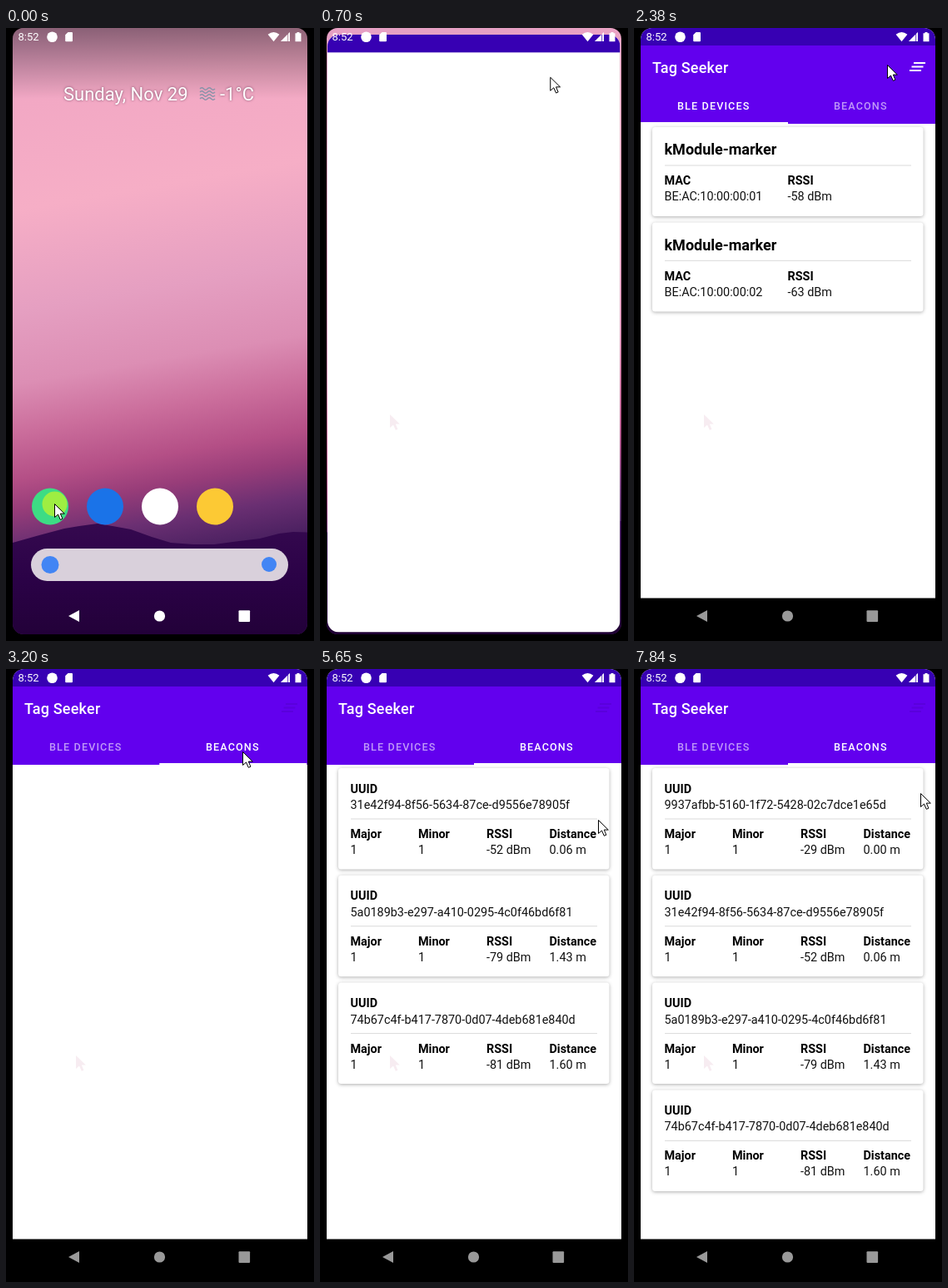
Recreate the animation shown at these times as an HTML page. Size 370 by 736 pixels, loop 8000 ms.

```html
<!DOCTYPE html>
<html lang="en">
<head>
<meta charset="utf-8">
<title>Beacon list</title>
<style>
  html, body { margin: 0; width: 100%; height: 100%; overflow: hidden; background: #000; }
  svg { display: block; width: 370px; height: 736px; }
  text { font-family: Roboto, "Noto Sans", sans-serif; font-size: 14.4px; fill: #111; white-space: pre; }
  .b { font-weight: 700; fill: #000; }
  .h { font-size: 18px; }
  .bar { font-size: 18px; font-weight: 500; letter-spacing: .22px; fill: #fff; }
  .tab { font-size: 12.6px; font-weight: 500; letter-spacing: 1.125px; fill: #fff; }
  .clock { font-size: 13px; fill: #fff; }
  .date { font-size: 22px; fill: #fff; filter: drop-shadow(0 0 1.5px rgba(60,20,50,.6)); }
  .card { fill: #fff; filter: drop-shadow(0 1.5px 2px rgba(0,0,0,.32)); }
</style>
</head>
<body>
<svg viewBox="0 0 370 736" xmlns="http://www.w3.org/2000/svg">
  <defs>
    <clipPath id="phone"><rect x="8" y="0" width="354" height="728" rx="13"/></clipPath>
    <clipPath id="winClip"><rect id="winShape" rx="16"/></clipPath>
    <linearGradient id="sky" gradientUnits="userSpaceOnUse" x1="110" y1="0" x2="230" y2="700">
      <stop offset="0" stop-color="#e6a0c4"/>
      <stop offset=".1" stop-color="#f2a8c4"/>
      <stop offset=".28" stop-color="#f6aec6"/>
      <stop offset=".45" stop-color="#e59fc1"/>
      <stop offset=".57" stop-color="#dc8eb4"/>
      <stop offset=".65" stop-color="#cb6e9c"/>
      <stop offset=".73" stop-color="#b44f86"/>
      <stop offset=".78" stop-color="#983d79"/>
      <stop offset=".84" stop-color="#6a2f72"/>
      <stop offset=".9" stop-color="#4a2060"/>
    </linearGradient>
    <linearGradient id="hill" x1="0" y1="0" x2="0" y2="1">
      <stop offset="0" stop-color="#35094f"/>
      <stop offset=".35" stop-color="#2b0247"/>
      <stop offset="1" stop-color="#1c002e"/>
    </linearGradient>
    <linearGradient id="scrim" x1="0" y1="0" x2="0" y2="1">
      <stop offset="0" stop-color="#000" stop-opacity=".4"/>
      <stop offset="1" stop-color="#000" stop-opacity="0"/>
    </linearGradient>
    <path id="arrow" d="M0 0V16L4 12.5 6.8 18.8 9.4 17.7 6.8 11.6H11.8Z"/>
  </defs>

  <rect width="370" height="736"/>
  <g clip-path="url(#phone)">
    <g id="home">
      <g id="paper">
        <rect x="-30" y="-40" width="430" height="820" fill="url(#sky)"/>
        <path fill="url(#hill)" d="M-30 626L8 618 40 609 70 601 88 598 110 595 128 598 150 602 175 611 198 618 225 620 250 620 280 616 305 613 328 607 345 605 400 607V780H-30Z"/>
      </g>
      <rect id="shade" x="8" width="354" height="85" fill="url(#scrim)"/>
      <g id="desk">
        <text class="date" x="69" y="87">Sunday, Nov 29</text>
        <text class="date" x="257" y="87">-1°C</text>
        <g id="fog" fill="none" stroke="#8c93a9" stroke-width="1.5"></g>
        <circle id="app" cx="53" cy="574.5" r="22" fill="#3ddc84"/>
        <circle cx="119" cy="574.5" r="22" fill="#1a73e8"/>
        <circle cx="185" cy="574.5" r="22" fill="#fff"/>
        <circle cx="251" cy="574.5" r="22" fill="#fcc934"/>
        <rect x="30" y="625" width="309" height="39" rx="19.5" fill="#d9d0db"/>
        <circle cx="53" cy="644.5" r="10.5" fill="#4285f4"/>
        <circle cx="316" cy="644" r="9" fill="#4285f4"/>
      </g>
    </g>

    <g id="win" clip-path="url(#winClip)">
      <rect id="winBody" fill="#fff"/>
      <rect id="winTop" fill="#3700b3"/>
    </g>

    <g id="screen">
      <g id="page1"></g>
      <g id="page2"></g>
      <rect x="8" y="21" width="354" height="94" fill="#6200ee"/>
      <text class="bar" x="22" y="54">Tag Seeker</text>
      <g fill="none" stroke-width="2">
        <path id="ghostMenu" stroke="#5a00dc" d="M336 42h14M333.5 46.5h14M331 51h14"/>
        <path id="menu" stroke="#fff" d="M336 42h14M333.5 46.5h14M331 51h14"/>
      </g>
      <text class="tab" id="tab1" x="52" y="98">BLE DEVICES</text>
      <text class="tab" id="tab2" x="240" y="98">BEACONS</text>
      <rect id="line" y="113" width="177" height="2" fill="#fff"/>
    </g>

    <g fill="#fff">
      <text class="clock" x="14.5" y="15.3">8:52</text>
      <circle cx="55.5" cy="10.7" r="6.3"/>
      <path d="M74.5 5H79a1 1 0 0 1 1 1V15.2a1 1 0 0 1-1 1H72.2a1 1 0 0 1-1-1V8.3Z"/>
      <path d="M321.5 16.3L314.6 7.8Q321.5 2.2 328.4 7.8Z"/>
      <path fill-opacity=".35" d="M341 5V16H330Z"/>
      <path d="M338 8V16H330ZM339.2 6.8L341 5V16H339.2Z"/>
      <path d="M349.5 5h3v1.2h2V16.3h-7V6.2h2Z"/>
    </g>
  </g>

  <rect id="navBar" y="684.5" width="370" height="52"/>
  <g id="nav">
    <path d="M75 706L88 699V713Z"/>
    <circle cx="184.5" cy="706" r="6.6"/>
    <rect x="279.5" y="699.3" width="13.6" height="13.6" rx="1"/>
  </g>
  <use id="trace" href="#arrow" x="84" y="464" fill="#f7ecf1"/>
  <circle id="press" r="15" fill="#ffff00" fill-opacity=".5"/>
  <use id="mouse" href="#arrow" fill="#fff" stroke="#000" stroke-width="1" stroke-linejoin="round"/>
</svg>

<script>
const $ = id => document.getElementById(id);
const set = (id, attrs) => {
  for (const k in attrs) $(id).setAttribute(k, attrs[k]);
};
const show = (id, on) => set(id, { display: on ? "inline" : "none" });

// ---- static parts
const label = (x, y, s, cls = "") => `<text x="${x}" y="${y}" class="${cls}">${s}</text>`;
const card = (y, h, rule) =>
  `<rect class="card" x="22" y="${y}" width="325.5" height="${h}" rx="3.5"/>
   <path d="M37 ${rule}H333" stroke="#dadada"/>`;

function deviceCard(y, mac, rssi) {
  return card(y, 107, y + 46) +
    label(36.5, y + 33.3, "kModule-marker", "b h") +
    label(36.5, y + 69.3, "MAC", "b") + label(36.5, y + 88.3, mac) +
    label(184.5, y + 69.3, "RSSI", "b") + label(184.5, y + 88.3, rssi + " dBm");
}

function beaconCard(id, rssi, dist) {
  const cols = [[36.5, "Major", 1], [118, "Minor", 1], [200, "RSSI", rssi + " dBm"], [275.5, "Distance", dist + " m"]];
  return "<g>" + card(119, 121.5, 180) +
    label(36.5, 148.5, "UUID", "b") + label(36.5, 168, id) +
    cols.map(([x, name, v]) => label(x, 203, name, "b") + label(x, 222, v)).join("") + "</g>";
}

$("page1").innerHTML =
  deviceCard(119, "BE:AC:10:00:00:01", -58) + deviceCard(233.4, "BE:AC:10:00:00:02", -63);

$("page2").innerHTML = [
  ["9937afbb-5160-1f72-5428-02c7dce1e65d", -29, "0.00"],
  ["31e42f94-8f56-5634-87ce-d9556e78905f", -52, "0.06"],
  ["5a0189b3-e297-a410-0295-4c0f46bd6f81", -79, "1.43"],
  ["74b67c4f-b417-7870-0d07-4deb681e840d", -81, "1.60"]
].map(b => beaconCard(...b)).join("");

$("fog").innerHTML = [73, 77, 81, 85]
  .map(y => `<path d="M233 ${y}q2.25-2.4 4.5 0t4.5 0 4.5 0 4.5 0"/>`).join("");

// ---- motion: rows of [time, values...]
const LOOP = 8000;
const STEPS = [[0, 80], [80, 50], [470, 40], [550, 50], [1370, 50], [2380, 30], [2410, 50], [2790, 60],
  [2970, 46], [3380, 40], [4170, 46], [5650, 50], [7140, 50], [7840, 50]];
const MOUSE = [[470, 58.5, 571.5], [510, 84, 464], [550, 143.5, 308.5], [600, 215, 160], [650, 265, 75],
  [750, 288.5, 43.5], [1470, 288.5, 43.5], [1620, 304.5, 41.5], [2350, 304.5, 41.5], [2380, 304.5, 44.5],
  [2610, 284.5, 99.5], [3340, 284.5, 99.5], [3660, 303.5, 201], [4124, 303.5, 201], [4400, 334.5, 181.5],
  [7090, 334.5, 181.5], [7340, 344.5, 149.5]];
const WINDOW = [[430, 31, 552, 44, 45], [470, 32, 500, 90, 120], [510, 30, 310, 210, 370],
  [550, 23, 126, 304, 588], [600, 14, 50, 338, 668], [650, 10, 16, 349, 707], [750, 8, 0, 354, 728]];
const SLIDE = [[2930, 0], [2970, .1], [3016, .42], [3062, .7], [3108, .87], [3154, .96], [3200, .996], [3380, 1]];

function at(t, keys) {
  let i = keys.findIndex(k => k[0] > t);
  if (i < 0) return keys[keys.length - 1].slice(1);
  if (i === 0) return keys[0].slice(1);
  const a = keys[i - 1], b = keys[i], p = (t - a[0]) / (b[0] - a[0]);
  return a.slice(1).map((v, j) => v + (b[j + 1] - v) * p);
}
const ramp = (t, from, to) => Math.min(1, Math.max(0, (t - from) / (to - from)));

function snap(t) {
  const [start, step] = STEPS.filter(s => s[0] <= t).pop();
  return start + Math.floor((t - start) / step) * step;
}

function draw(time) {
  const t = snap(time);

  // launcher
  const [leave] = at(t, [[430, 0], [550, 1], [700, 1.72]]);
  show("home", t < 900);
  set("desk", { opacity: 1 - .58 * leave, transform: `translate(0 ${-22 * leave})` });
  set("paper", { transform: `translate(185 368) scale(${1 - .034 * leave}) translate(-185 -368)` });
  set("shade", { opacity: Math.max(0, 1 - .6 * leave) });
  set("app", { r: at(t, [[0, 22], [80, 23], [130, 25], [180, 24], [230, 22]])[0] });

  // opening window
  const [x, y, width, height] = at(t, WINDOW);
  const box = { x, y, width, height };
  show("win", t >= 470);
  set("winShape", { ...box, rx: 16 - 3 * ramp(t, 550, 750) });
  set("winBody", box);
  set("winTop", { x, y, width, height: 21.5 * width / 354 });

  // navigation bar
  set("navBar", { opacity: ramp(t, 700, 950) });
  const grey = Math.round(255 - 31 * ramp(t, 950, 1370) - 71 * ramp(t, 1370, 1970));
  set("nav", { fill: `rgb(${grey},${grey},${grey})` });

  // app
  const [p] = at(t, SLIDE);
  show("screen", t >= 1420);
  set("page1", { opacity: ramp(t, 1720, 1920), transform: `translate(${-354 * p} 0)` });
  set("line", { x: 8 + 177 * p });
  const second = t >= 2970;
  set("tab1", { "fill-opacity": second ? .6 : 1 });
  set("tab2", { "fill-opacity": second ? 1 : .6 });
  set("menu", { opacity: 1 - ramp(t, 2930, 3016) });
  show("ghostMenu", second);

  const count = t >= 7840 ? 4 : t >= 5650 ? 3 : 2;
  set("page2", { opacity: ramp(t, 3340, 3500) });
  [...$("page2").children].forEach((g, i) => {
    const row = i - (4 - count);
    g.setAttribute("display", row < 0 ? "none" : "inline");
    g.setAttribute("transform", `translate(0 ${row * 128.8})`);
  });

  // pointer
  const [mx, my] = at(t, MOUSE);
  set("mouse", { x: mx, y: my });
  set("press", { cx: mx, cy: my });
  show("press", t < 80 || (t >= 2790 && t < 2970));
  show("trace", t >= 550);
}

function tick() {
  draw(performance.now() % LOOP);
  requestAnimationFrame(tick);
}
tick();
</script>
</body>
</html>
```
